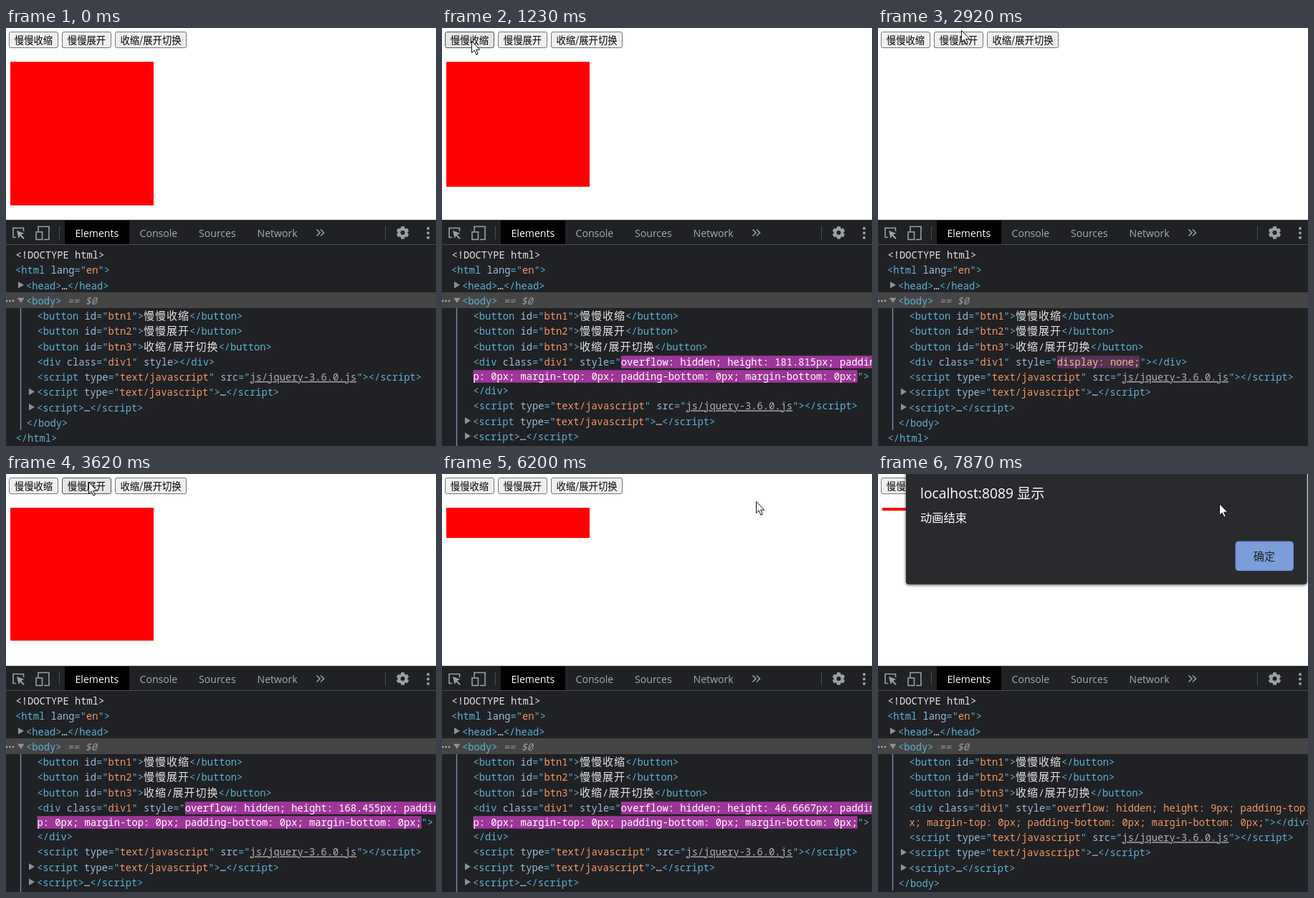
Recreate the animation shown at these times as an HTML page. Size 600 by 582 pixels, loop 8 s.

```html
<!DOCTYPE html>
<html lang="zh">
<head>
<meta charset="utf-8">
<style>
  html, body { margin: 0; width: 100%; height: 100%; overflow: hidden; background: #fff; }
  svg { display: block; width: 600px; height: 582px; }
  text { white-space: pre; }
  .ui { font-family: "Open Sans", "Noto Sans CJK SC", "Noto Sans CJK", sans-serif; }
  .code { font: 500 13.75px "Noto Sans Mono", "Noto Sans CJK SC", "Noto Sans CJK", monospace; }
  .cjk { font: 300 15px "Noto Sans CJK SC", "Noto Sans CJK", sans-serif; letter-spacing: 1px; }
  .btn text { font: 13.33px "Noto Sans CJK SC", "Noto Sans CJK", sans-serif; }
  .tab { font-size: 14.1px; fill: #a6acb2; }
  #panel { filter: drop-shadow(0 1px 2px rgba(0,0,0,.7)); }
</style>
</head>
<body>
<svg viewBox="0 0 600 582">
  <rect width="600" height="582" fill="#fff"/>
  <g id="buttons"></g>
  <rect id="box" x="6" y="47" width="200" height="200" fill="#f00"/>

  <rect y="267" width="600" height="315" fill="#202124"/>
  <rect y="267" width="600" height="1" fill="#3c3f43"/>
  <rect y="301" width="600" height="1" fill="#494c50"/>
  <rect x="82" y="268" width="90" height="33" fill="#000"/>
  <path d="M74.500 276v18M529.500 276v18" stroke="#494c50"/>
  <g fill="none" stroke="#9aa0a6" stroke-width="1.6">
    <path d="M14 291.5H10V278.5H24.500V283"/>
    <path d="M45 283V276.500H60V294.500H53"/>
    <rect x="42" y="284" width="8.500" height="10.500"/>
    <path d="M433.500 280.500l4.500 4.500-4.500 4.500M439 280.500l4.500 4.500-4.500 4.500"/>
  </g>
  <path d="M15 282l10.500 4-4.500 1.800 4.800 4.800-1.500 1.500-4.800-4.800-1.800 4z" fill="#9aa0a6"/>
  <g id="gear" fill="#9aa0a6"></g>
  <g fill="#9aa0a6">
    <circle cx="589" cy="279" r="2"/><circle cx="589" cy="285.500" r="2"/><circle cx="589" cy="292" r="2"/>
  </g>
  <g class="ui">
    <text class="tab" x="96.500" y="291" style="fill:#fff">Elements</text>
    <text class="tab" x="186.500" y="291">Console</text>
    <text class="tab" x="269" y="291">Sources</text>
    <text class="tab" x="350.500" y="291">Network</text>
  </g>

  <rect y="368" width="600" height="22" fill="#454545"/>
  <g fill="#b0b0b0">
    <circle cx="1" cy="380" r="1.300"/><circle cx="5.500" cy="380" r="1.300"/><circle cx="10" cy="380" r="1.300"/>
  </g>
  <path id="guide" stroke="#7089ab" stroke-width="1.500"/>
  <g id="marks"></g>
  <g id="tree" class="code"></g>

  <g id="dialog" class="ui">
    <g id="panel"><rect x="39" y="-40" width="559.500" height="193.500" rx="4" fill="#292a2d"/></g>
    <text x="59" y="33.500" font-size="19.300" fill="#fff">localhost:8089 显示</text>
    <text x="59" y="67" font-size="16.300" fill="#fff">动画结束</text>
    <rect x="499" y="94" width="80.500" height="40.500" rx="4" fill="#7b9dd9" stroke="#6b8ccb"/>
    <text x="524" y="120" font-size="15" fill="#202124">确定</text>
  </g>
  <path id="cursor" d="M.5 .5V16.500L4.200 13 6.800 19 9.300 18 6.700 12.200H11.800Z" fill="#fff" stroke="#111"/>
</svg>
<script>
const $ = id => document.getElementById(id);
const clamp = v => Math.max(0, Math.min(1, v));
const LOOP = 8000, CH = 8.25, ROW = 21.25, TOP = 321;
const TAG = '#5db0d7', NAME = '#9bbbdc', VALUE = '#f29766', PLAIN = '#e3e3e3';

const buttons = [[4, 69, '慢慢收缩'], [78, 69, '慢慢展开'], [152, 100, '收缩/展开切换']];
$('buttons').innerHTML = buttons.map(([x, w, label]) =>
  `<g class="btn"><rect x="${x + .5}" y="5.5" width="${w - 1}" height="22" rx="2.5"/>` +
  `<text x="${x + w / 2}" y="22" text-anchor="middle">${label}</text></g>`).join('');
const buttonRects = [...document.querySelectorAll('.btn rect')];

let gear = '';
for (let a = 0; a < 360; a += 60)
  gear += `<rect x="551" y="276.300" width="5" height="5" rx=".8" transform="rotate(${a} 553.5 285)"/>`;
$('gear').innerHTML = gear + '<circle cx="553.500" cy="285" r="5" fill="none" stroke="#9aa0a6" stroke-width="4"/>';

// Markup tokens
const esc = s => s.replace(/&/g, '&amp;').replace(/</g, '&lt;');
const span = (color, s, more = '') => `<tspan fill="${color}" ${more}>${esc(s)}</tspan>`;
const open = (name, attrs = '') => span(TAG, '<' + name) + attrs + span(TAG, '>');
const close = name => span(TAG, `</${name}>`);
const attr = (name, value, color = VALUE, more) =>
  span(NAME, ' ' + name) + span(TAG, '="') + span(color, value, more) + span(TAG, '"');
const line = (x, y, s) => `<text x="${x}" y="${y}">${s}</text>`;
const label = s => s.split('/').map(part => span(PLAIN, part, 'class="cjk"')).join(span(PLAIN, '/'));
const button = (id, s) => open('button', attr('id', id)) + label(s) + close('button');
const arrow = (x, y) => `<path d="M${x} ${y - 10.5}l8 4.700-8 4.700z" fill="#8f9195"/>`;
const mark = (x, y, chars, color) =>
  `<rect x="${x}" y="${y - 13.5}" width="${chars * CH}" height="17.500" rx="1" fill="${color}"/>`;

const mix = (a, b, p) => `rgb(${a.map((v, i) => Math.round(v + (b[i] - v) * p))})`;
const PURPLE = [158, 54, 153], GREY = [51, 51, 51], DARK = [32, 33, 36];
const WHITE = [255, 255, 255], BLUE = [155, 187, 220], ORANGE = [242, 151, 102];

function highlight(age, ink) {
  const p = clamp(age / 21);
  return {
    back: p < .8 ? mix(PURPLE, GREY, p / .8) : mix(GREY, DARK, (p - .8) / .2),
    ink: mix(WHITE, ink, clamp(p / .8)),
  };
}

let lastTree = '';
function drawTree(style, age) {
  const key = style + '|' + Math.min(age, 21);
  if (key === lastTree) return;
  lastTree = key;

  const y = i => TOP + ROW * i;
  const { back, ink } = highlight(age, style ? ORANGE : BLUE);
  const start = span(TAG, '<div') + attr('class', 'div1');
  const end = span(TAG, '>') + close('div');
  let out = line(13.5, y(0), span(PLAIN, '<!DOCTYPE html>'))
    + line(13, y(1), open('html', attr('lang', 'en')))
    + arrow(17, y(2)) + line(28, y(2), open('head') + span(PLAIN, '…') + close('head'))
    + `<path d="M16 ${y(3) - 9}h9.500l-4.750 7z" fill="#8f9195"/>`
    + line(28, y(3), open('body') + span('#9a9a9a', ' == $0', 'font-style="italic"'))
    + line(43.5, y(4), button('btn1', '慢慢收缩'))
    + line(43.5, y(5), button('btn2', '慢慢展开'))
    + line(43.5, y(6), button('btn3', '收缩/展开切换'));
  let marks = '', shift = 0;
  const dy = y(7), valueX = 43.5 + 25 * CH;

  if (!style) {
    marks = mark(43.5 + 18 * CH, dy, 5, back);
    out += line(43.5, dy, start + span(NAME, ' ') + span(ink, 'style') + end);
  } else if (style.length < 20) {
    marks = mark(valueX, dy, style.length, back);
    out += line(43.5, dy, start + attr('style', style, ink) + end);
  } else {
    const cut = style.length > 108 ? 47 : 46;
    const first = style.slice(0, cut), rest = style.slice(cut);
    const wrap = rest.length > 62;
    marks = mark(valueX, dy, cut, back) + mark(43.5, dy + 20, rest.length, back);
    out += line(43.5, dy, start + span(NAME, ' style') + span(TAG, '="') + span(ink, first))
      + line(43.5, dy + 20, span(ink, rest) + span(TAG, '"') + (wrap ? span(TAG, '>') : end));
    if (wrap) out += line(43.5, dy + 40, close('div'));
    shift = wrap ? 40.3 : 20.2;
  }

  const low = i => y(i) + shift;
  const type = attr('type', 'text/javascript');
  out += line(43.5, low(8), open('script', type
      + attr('src', 'js/jquery-3.6.0.js', '#b0b0b0', 'text-decoration="underline"')) + close('script'))
    + arrow(32, low(9)) + line(43, low(9), open('script', type) + span(PLAIN, '…') + close('script'))
    + arrow(32, low(10)) + line(43, low(10), open('script') + span(PLAIN, '…') + close('script'))
    + line(28.5, low(11), close('body'))
    + line(13.5, low(12), close('html'));
  $('marks').innerHTML = age < 21 ? marks : '';
  $('tree').innerHTML = out;
  $('guide').setAttribute('d', `M20.500 390V${low(11) + 5}`);
}

// Heights: eased collapse, eased expand, linear collapse
const swing = p => .5 - Math.cos(clamp(p) * Math.PI) / 2;
function heights(k) {
  if (k < 40) {
    const h = lag => 200 * (1 - swing((k - 15.075 + lag) / 15));
    return [h(.6), h(0)];
  }
  if (k < 70) {
    const h = lag => 200 * swing((k - 45.34 + lag) / 9);
    return [h(.75), h(0)];
  }
  const p = clamp((k - 77.5) / 15);
  return [p ? 200 * (1 - Math.min(.98, p + .025)) : 200, 200 * (1 - Math.min(.955, p))];
}

function styleAt(k, h) {
  if (k < 16) return ['', 21];
  if (k > 30 && k < 46) return ['display: none;', k - 30.5];
  if (k > 54 && k < 78) return ['', k - 54.5];
  const px = Number(h.toPrecision(6));
  return [`overflow: hidden; height: ${px}px; padding-top: 0px; margin-top: 0px; ` +
    'padding-bottom: 0px; margin-bottom: 0px;', Math.max(0, k - 91.8)];
}

// Pointer path: step, x, y
const path = [
  [1, 420, 530], [6, 200, 200], [10, 70, 20], [12, 45, 1], [13, 41, 18], [22, 41, 18],
  [27, 147, 4], [30, 128, 9], [34, 118, 10], [41, 118, 10], [42, 116, 3], [43, 115, 11],
  [67, 115, 11], [73, 203, 23], [78, 203, 23], [84, 350, 30], [91, 473, 41],
  [108, 473, 41], [113, 476, 41],
];
function pointer(k) {
  const i = path.findIndex(s => s[0] >= k);
  if (i < 0) return path[path.length - 1].slice(1);
  if (!i) return path[0].slice(1);
  const [a, b] = [path[i - 1], path[i]], p = (k - a[0]) / (b[0] - a[0]);
  return [a[1] + (b[1] - a[1]) * p, a[2] + (b[2] - a[2]) * p];
}

function draw(t) {
  // The screen refreshes about every 70 ms
  const k = Math.floor((t + Math.min(30, t / 20) + (t > 5300 ? 10 : 0)) / 70);
  const [boxH, textH] = heights(k);
  $('box').setAttribute('height', Math.round(boxH));
  drawTree(...styleAt(k, textH));

  const [x, y] = pointer(k).map(Math.round);
  $('cursor').setAttribute('transform', `translate(${x} ${y})`);
  $('cursor').style.display = k ? '' : 'none';
  buttonRects.forEach((r, i) => {
    const [bx, w] = buttons[i];
    const hover = k && x >= bx && x < bx + w && y >= 5 && y < 28;
    r.setAttribute('fill', hover ? '#e5e5e5' : '#efefef');
    r.setAttribute('stroke', hover ? '#4f4f4f' : '#767676');
  });

  const shown = clamp((k - 93.6) / 2.7), grow = 1 + .01 * (1 - shown);
  $('dialog').style.display = shown ? '' : 'none';
  $('dialog').setAttribute('opacity', shown);
  $('dialog').setAttribute('transform',
    `translate(${319 * (1 - grow)} ${-24 * (1 - shown)}) scale(${grow})`);
}

function tick() {
  draw(performance.now() % LOOP);
  requestAnimationFrame(tick);
}
tick();
</script>
</body>
</html>
```
